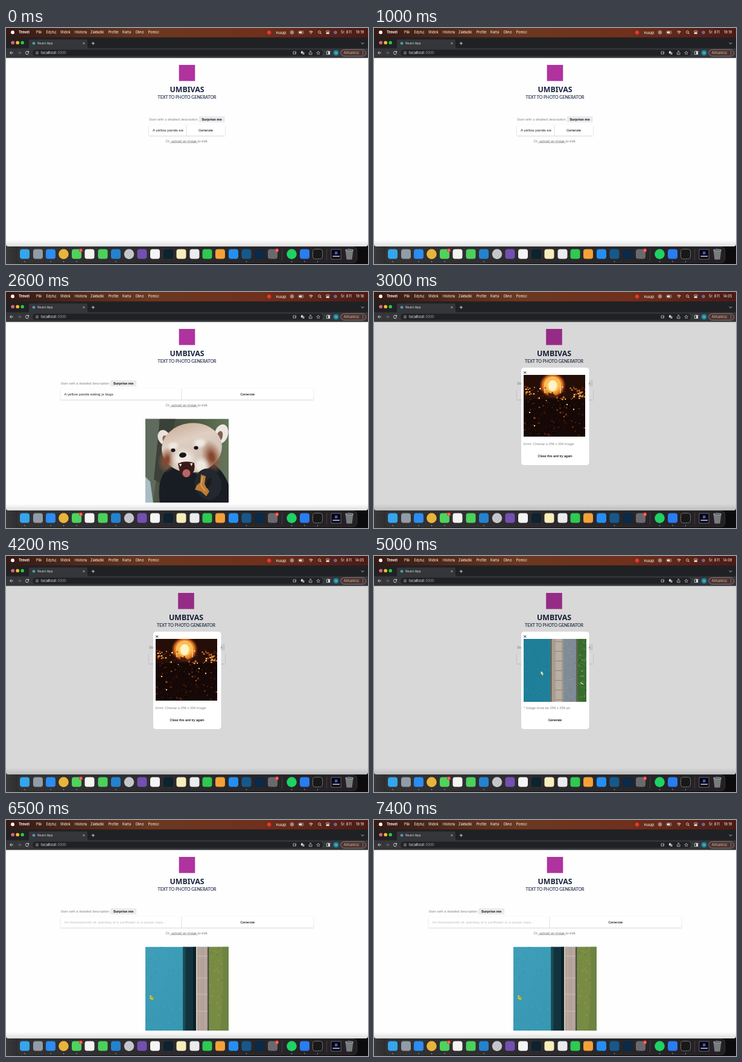
These frames come from a looping animation (600x390 px, 7500 ms). An HTML page:

```html
<!DOCTYPE html>
<html lang="pl">
<head>
<meta charset="utf-8">
<title>Text to photo generator</title>
<style>
html, body { margin: 0; width: 100%; height: 100%; overflow: hidden; background: #120d0d; }
svg { display: block; width: 100vw; height: 100vh; }
text { white-space: pre; font-family: "Liberation Sans", Arial, sans-serif; }
.ui { font-family: Inter, Roboto, sans-serif; }
.brand { font-family: "Noto Sans", "Open Sans", sans-serif; }
.tag { font-family: Lato, "Open Sans", sans-serif; }
</style>
</head>
<body>
<svg id="stage" viewBox="0 0 600 390" preserveAspectRatio="none">
  <defs>
    <linearGradient id="bar">
      <stop offset="0" stop-color="#351a13"/><stop offset=".4" stop-color="#6c3820"/>
      <stop offset=".7" stop-color="#70301c"/><stop offset="1" stop-color="#4b1a16"/>
    </linearGradient>
    <linearGradient id="desk">
      <stop offset="0" stop-color="#39383a"/><stop offset=".06" stop-color="#252426"/>
      <stop offset=".5" stop-color="#171517"/><stop offset="1" stop-color="#0b0a0c"/>
    </linearGradient>
    <linearGradient id="shelf">
      <stop offset="0" stop-color="#333235"/><stop offset="1" stop-color="#242024"/>
    </linearGradient>
    <linearGradient id="shade" x2="0" y2="1">
      <stop offset="0" stop-opacity="0"/><stop offset="1" stop-opacity=".13"/>
    </linearGradient>
    <linearGradient id="wood">
      <stop offset="0" stop-color="#596653"/><stop offset=".25" stop-color="#454a3f"/>
      <stop offset=".6" stop-color="#4c5940"/><stop offset="1" stop-color="#65775a"/>
    </linearGradient>
    <linearGradient id="face" x2=".25" y2="1">
      <stop offset="0" stop-color="#c9aa94"/><stop offset=".4" stop-color="#dfcfc2"/>
      <stop offset="1" stop-color="#cbbcb0"/>
    </linearGradient>
    <radialGradient id="patch">
      <stop offset=".2" stop-color="#87472f"/><stop offset="1" stop-color="#a36c50" stop-opacity="0"/>
    </radialGradient>
    <radialGradient id="pale">
      <stop offset=".4" stop-color="#efe8e1"/><stop offset="1" stop-color="#e4d8cd" stop-opacity="0"/>
    </radialGradient>
    <linearGradient id="sea" x2="1" y2="1">
      <stop offset="0" stop-color="#3f9eb8"/><stop offset="1" stop-color="#3494b1"/>
    </linearGradient>
    <radialGradient id="glow">
      <stop offset="0" stop-color="#fff3b8"/><stop offset=".45" stop-color="#ffc251"/>
      <stop offset=".74" stop-color="#d9691a"/><stop offset="1" stop-color="#3a1208" stop-opacity="0"/>
    </radialGradient>
    <filter id="soft" x="-10%" y="-30%" width="120%" height="180%">
      <feDropShadow dx="0" dy="1" stdDeviation="1" flood-color="#223" flood-opacity=".22"/>
    </filter>
    <clipPath id="field"><rect x="240" y="160" width="53.5" height="18"/></clipPath>
    <clipPath id="p138"><rect width="138" height="138.5"/></clipPath>
    <clipPath id="p102"><rect width="102" height="102"/></clipPath>
    <clipPath id="p104"><rect width="104" height="104"/></clipPath>
  </defs>
</svg>
<script>
const LOOP = 7500;
const rect = (x, y, w, h, fill, more = "") =>
  `<rect x="${x}" y="${y}" width="${w}" height="${h}" fill="${fill}" ${more}/>`;
const dot = (x, y, r, fill, more = "") => `<circle cx="${x}" cy="${y}" r="${r}" fill="${fill}" ${more}/>`;
const oval = (x, y, rx, ry, fill, turn = 0) =>
  `<ellipse cx="${x}" cy="${y}" rx="${rx}" ry="${ry}" fill="${fill}" transform="rotate(${turn} ${x} ${y})"/>`;
const text = (x, y, s, size, fill, more = "") =>
  `<text x="${x}" y="${y}" font-size="${size}" fill="${fill}" ${more}>${s}</text>`;
const line = (d, color, w = 0.9, more = "") =>
  `<path d="${d}" fill="none" stroke="${color}" stroke-width="${w}" ${more}/>`;
const shape = (d, fill) => `<path d="${d}" fill="${fill}"/>`;
const MID = 'text-anchor="middle"', BOLD = 'font-weight="700"', UI = 'class="ui"';

function seeded(n) {
  return () => (n = (n * 16807) % 2147483647) / 2147483647;
}

function specks(seed, count, [x, y, w, h], colors, size) {
  const rnd = seeded(seed);
  let out = "";
  for (let i = 0; i < count; i++) {
    const px = x + rnd() * w, py = y + rnd() * h, s = size * (0.4 + rnd());
    out += rect(px.toFixed(1), py.toFixed(1), s.toFixed(1), (s * 0.8).toFixed(1),
      colors[Math.floor(rnd() * colors.length)]);
  }
  return out;
}

function menuBar() {
  const items = [[50, "Plik"], [66.5, "Edytuj"], [90, "Widok"], [114, "Historia"], [140, "Zakładki"],
    [169.5, "Profile"], [193, "Karta"], [214.5, "Okno"], [235.5, "Pomoc"]];
  return rect(0, 0, 600, 16, "url(#bar)") + dot(11, 7.2, 2.9, "#fff") +
    text(21, 9.3, "Trovel", 5.9, "#fff", `${UI} ${BOLD}`) +
    items.map(([x, s]) => text(x, 9.3, s, 5.6, "#fff", UI)).join("") +
    dot(436, 7.5, 3.3, "#e2392c") + text(447.5, 9.6, "nuup", 7, "#fff", UI) +
    dot(474, 7.2, 2.7, "none", 'stroke="#fff" stroke-width=".7"') + shape("M473.2 5.7l2.4 1.5-2.4 1.5z", "#fff") +
    rect(485, 5, 8, 4.4, "none", 'rx="1.2" stroke="#ddd" stroke-width=".6"') + rect(486, 6, 4.5, 2.4, "#fff") +
    line("M502.5 6.2q3-2.4 6 0M503.7 7.7q1.8-1.4 3.6 0", "#fff") + dot(505.5, 9.1, 0.7, "#fff") +
    dot(519.5, 6.7, 2, "none", 'stroke="#fff" stroke-width=".7"') + line("M521 8.2l1.8 1.8", "#fff") +
    rect(530.5, 4.6, 5.5, 2.2, "none", 'rx="1.1" stroke="#fff" stroke-width=".6"') +
    rect(530.5, 7.6, 5.5, 2.2, "#fff", 'rx="1.1"') + dot(546, 7.2, 2.8, "#6d6699") +
    text(555, 9.3, "Śr. 8.11", 5.7, "#fff", UI) + text(593.3, 9.3, "", 5.7, "#fff", `${UI} id="clock" text-anchor="end"`);
}

function browser() {
  const pale = "#dfe1e5";
  return `<path d="M0 49.5V18q0-2.5 2.5-2.5h595q2.5 0 2.5 2.5v31.5z" fill="#202124"/>` +
    ["#fe5f57", "#febc2e", "#28c840"].map((c, i) => dot(11.2 + i * 8, 24.2, 2.8, c)).join("") +
    rect(0, 33.5, 600, 16, "#35363a") +
    shape("M35 34q3 0 3-3v-9q0-3 3-3h91q3 0 3 3v9q0 3 3 3z", "#35363a") +
    dot(46, 25.3, 2.4, "#4a9fb0") + text(52.3, 27.2, "React App", 5.2, pale, UI) +
    line("M127.3 23.8l3 3m0-3l-3 3", pale, 0.7) + line("M141.8 25.3h5.2m-2.6-2.6v5.2", pale) +
    line("M588.8 24.3l2.2 2.2 2.2-2.2", pale) +
    line("M12 41H6.7m2.4-2.5L6.6 41l2.5 2.5", pale) + line("M19.5 41h5.3m-2.4-2.5L24.9 41l-2.5 2.5", "#77797d") +
    line("M37.2 39.6a2.6 2.6 0 1 0 .4 2", pale) + shape("M38 37.8v2.7h-2.7z", pale) +
    rect(44, 35.8, 481, 10.4, "#202124", 'rx="5.2"') +
    dot(51.5, 41, 2.2, "none", 'stroke="#bdc1c6" stroke-width=".7"') + rect(51.1, 40.5, 0.8, 1.8, "#bdc1c6") +
    text(58, 43.1, 'localhost<tspan fill="#9aa0a6">:3000</tspan>', 5.9, "#f1f3f4", UI) +
    line("M476 39h2.5m2 2v2H476v-4m4-1v3m-1.2-1l1.2 1.2 1.2-1.2", pale, 0.7) +
    rect(489, 38.5, 3.3, 3.6, pale) + rect(491.2, 40.2, 3.3, 3.6, "#9aa0a6") +
    line("M503.2 40.5h-.8v3.2h4.6v-3.2h-.8m-1.5 1.2v-3.9m-1.2 1.1l1.2-1.2 1.2 1.2", pale, 0.7) +
    line("M517.6 38.2l.8 1.9 2 .2-1.5 1.4.4 2-1.7-1-1.7 1 .4-2-1.5-1.4 2-.2z", pale, 0.6) +
    rect(531.4, 38.4, 5.3, 5.2, "none", `rx=".6" stroke="${pale}" stroke-width=".8"`) + rect(534, 38.4, 2.7, 5.2, pale) +
    dot(547, 41, 4.5, "#13899a") + text(547, 42.8, "N", 4.8, "#cfeaf0", `${UI} ${MID}`) +
    rect(555, 35.7, 41.5, 10.8, "#443533", 'rx="5.4" stroke="#c98a80" stroke-width=".7"') +
    text(559.5, 43, "Aktualizuj", 5.5, "#f1b2a7", UI) +
    [38.8, 41, 43.2].map(y => dot(591.5, y, 0.6, "#f1b2a7")).join("");
}

function dock() {
  const icons = [[31, "#35a5ec"], [53, "#929ba6"], [74, "#2b8df0"], [95.5, "#e9b43b", 1], [117, "#4dd45d"],
    [138.5, "#f5f3f0"], [160.5, "#4bd15c"], [182, "#2383cf"], [204, "#c4c6cc", 1], [225.5, "#7350b2"],
    [247, "#f5f5f5"], [269, "#0e222f"], [290.5, "#f8eebb"], [312.5, "#e9ebec"], [333.5, "#2fca50"],
    [355, "#f3a13a"], [377, "#2490f3"], [398.5, "#16588c"], [420.5, "#0b2a47"], [442, "#686a70"],
    [473.5, "#1fd264", 1], [495, "#287df0"], [516.5, "#17181a"]];
  const badge = x => dot(x, 367.5, 3, "#f1453d") + text(x, 369, "2", 4, "#fff", `${UI} ${MID}`);
  return rect(20, 361.6, 562, 26.4, "url(#shelf)", 'rx="6" stroke="#434145" stroke-width=".5"') +
    icons.map(([x, c, round]) => round ? dot(x, 373.6, 8.3, c) :
      rect(x - 8, 365.6, 16, 16, c, `rx="3.8" ${x === 516.5 ? 'stroke="#8a8b8e" stroke-width=".7"' : ""}`)).join("") +
    badge(124) + badge(449) +
    [457.5, 531.5].map(x => rect(x, 365, 0.6, 19, "#5b5a5f")).join("") +
    rect(539, 366, 16, 16, "#05060d", 'stroke="#9999a2" stroke-width=".6"') + rect(545, 369.5, 4.5, 4.5, "#4254dd") +
    rect(541.5, 376.5, 11.5, 1.6, "#c6c8d8") +
    shape("M562.5 367h13l-1.8 14.5q-.2 1.2-1.3 1.2h-6.8q-1.1 0-1.3-1.2z", "#777b80") +
    oval(569, 367, 6.7, 1.8, "#b5b8bc") + oval(569, 367.2, 5.2, 1.1, "#5d6165") +
    [31, 74, 95.5, 117, 182, 398.5, 473.5, 495, 516.5].map(x => dot(x, 386, 0.7, "#c9c9cc")).join("");
}

function logo(dx) {
  return `<g transform="translate(${dx} 0)">` + rect(286.7, 61, 26.6, 26.6, "#b0329f") +
    text(300, 106, "UMBIVAS", 12.4, "#1b2440", `class="brand" ${MID} ${BOLD}`) +
    text(300, 116.7, "TEXT TO PHOTO GENERATOR", 7, "#26304d",
      `class="tag" ${MID} stroke="#26304d" stroke-width=".15"`) + "</g>";
}

function form(wide, words, color) {
  const x = wide ? 90.5 : 237, w = wide ? 419 : 126, split = wide ? 291 : 299;
  return text(x, 153, "Start with a detailed description", 5.82, "#858585") +
    rect(x + 82.5, 145.7, 43.3, 10.3, "#ebebef", 'rx="1.5"') +
    text(x + 87.2, 153, "Surprise me", 5.8, "#111", BOLD) +
    rect(x, 160, w, 17.5, "#fff", 'rx="1.5" filter="url(#soft)"') + rect(split - 0.4, 160, 0.8, 17.5, "#d8d8df") +
    `<g ${wide ? "" : 'clip-path="url(#field)"'}>` + text(x + 6, 170.8, words, 6.18, color) + "</g>" +
    text((split + x + w) / 2, 170.8, "Generate", 5.76, "#444", `${MID} stroke="#444" stroke-width=".15"`) +
    text(264.5, 188.5, 'Or,<tspan text-decoration="underline"> upload an image </tspan>to edit.', 5.75, "#777");
}

const sheet = (fill, more = "") => `<path d="M0 49.5H600V357q0 4-4 4H4q-4 0-4-4z" fill="${fill}" ${more}/>`;

const page = body => sheet("#fefefe") + body;

function photo(x, y, size, body) {
  return `<g transform="translate(${x} ${y})" clip-path="url(#p${size})">${body}</g>`;
}

function panda() {
  return rect(0, 0, 138, 139, "url(#wood)") + shape("M0 0h22q6 45-2 85l-8 54H0z", "#5f6b5c") +
    shape("M24 0h26L36 60 30 110 14 100z", "#3a4138") + shape("M0 96l8 8 5 35H0z", "#a9bcc6") +
    shape("M24 139q-6-44 16-58l66-12q24 16 32 40v30z", "#171d23") +
    oval(31, 31, 10, 13, "#e9e2da", -25) + oval(34, 35, 5, 8, "#8a6a58", -25) +
    oval(126, 25, 11, 16, "#ece7e0", 15) + oval(123, 29, 5, 9, "#806153", 15) +
    oval(77, 48, 50, 41, "url(#face)", -6) +
    oval(36, 68, 15, 22, "url(#patch)", 12) + oval(110, 63, 17, 29, "url(#patch)", -15) +
    oval(46, 45, 12, 9, "url(#pale)", -10) + oval(90, 40, 14, 10, "url(#pale)", -10) +
    oval(63, 66, 25, 20, "url(#pale)") + oval(92, 78, 15, 17, "url(#pale)", -10) +
    oval(46, 52, 3.6, 3, "#1a1413") + oval(84, 48, 3.6, 3, "#1a1413") +
    oval(62, 60, 6, 4.2, "#1a1716", -6) +
    shape("M54 74q12-6 27-1 3 13-7 23-11 4-16-5z", "#3b1918") + oval(68, 90, 6.5, 6.5, "#b86766", -15) +
    shape("M56 74.5l2 5 2.5-5zm18-1l2.5 5 2-5z", "#f1e6da") +
    oval(104, 108, 22, 26, "#22282d", -12) +
    shape("M92 92l8 3-2 13 8 12-5 8-9-8-10-3 3-7 6-5z", "#bd7b35") + line("M95 96l-3 14 7 9", "#dba45a", 1.6) +
    oval(105, 106, 4, 9, "#181d22", 20);
}

function sparks() {
  return rect(0, 0, 102, 102, "#150806") + rect(0, 0, 102, 40, "#30120a", 'opacity=".65"') +
    oval(48, 17, 23, 22, "url(#glow)") +
    line("M35 30V17a13 13 0 0 1 26 0v13", "#ffdf8d", 1.8, 'stroke-dasharray="1.8 .8"') +
    oval(48, 18, 7, 9, "#fff4c8") + shape("M41 36v-7l4 2 3-3 5 8z", "#4a1c0b") +
    specks(71, 60, [0, 18, 101, 24], ["#f29a3f", "#b34a16", "#6b2611", "#ffc871"], 2.2) +
    specks(17, 16, [2, 20, 18, 12], ["#ffb95a", "#d8702a"], 2.2) +
    specks(23, 18, [78, 22, 22, 20], ["#ffc56b", "#c95f22"], 2.2) +
    specks(29, 130, [0, 40, 101, 61], ["#48180d", "#6a2310", "#2c100a", "#080303", "#a94d20"], 2.2) +
    [[10, 62], [83, 57], [18, 84], [72, 49], [84, 33]].map(([x, y]) => dot(x, y, 1.2, "#ffce82")).join("");
}

function canal() {
  return rect(0, 0, 104, 104, "#1f7f99") + specks(11, 110, [0, 0, 43, 104], ["#2c8ba2", "#18738d"], 1.4) +
    rect(44.5, 0, 22, 104, "#a99e91") + rect(44.5, 0, 2, 104, "#5d584f") + rect(51, 0, 13, 104, "#b9afa2") +
    Array.from({ length: 7 }, (_, i) => rect(52, 4 + i * 16, 12, 0.8, "#82786e")).join("") +
    line("M52 0v104M64 0v104", "#887e73", 0.7) +
    rect(66.5, 0, 22, 104, "#7f8c97") + specks(53, 85, [67, 0, 20, 104], ["#94a0a7", "#6c7986", "#928b82"], 1.4) +
    rect(87, 0, 2.5, 104, "#6b6149") + rect(89.5, 0, 15, 104, "#386d30") +
    specks(91, 80, [89, 0, 15, 104], ["#4b853b", "#275427", "#719b4a"], 1.7) +
    oval(30.5, 57, 1.6, 3.2, "#eee5b5", -25) + dot(31, 58, 1, "#e3a42c") + line("M94 72l5 3", "#eceee4", 1.3);
}

function shore() {
  return rect(0, 0, 138, 139, "url(#sea)") + specks(37, 75, [0, 0, 61, 138], ["#48a5bd", "#338ea9"], 1.7) +
    rect(62.5, 0, 22, 139, "#12323d") + rect(62.5, 0, 4, 139, "#194a57") + rect(79, 0, 5, 139, "#0a2029") +
    rect(84, 0, 2, 139, "#d5c8b8") + rect(86, 0, 17, 139, "#b3a29a") + line("M90 0v139M99 0v139", "#c4b6ac", 0.8) +
    [15, 51, 78, 106].map(y => rect(86, y, 17, 1, "#cdbfb4")).join("") +
    rect(103, 0, 2.5, 139, "#514f37") + rect(105.5, 0, 33, 139, "#788b43") +
    specks(43, 70, [105, 0, 33, 139], ["#84964d", "#697c3a", "#918f52"], 2.6) +
    shape("M128 0h10v139h-14q7-65 4-139z", "#6f8342") +
    shape("M7.3 80l3 1 3.5 5-2.2 2-4-2z", "#e9c532") + line("M9 82l3 4", "#705e24", 0.8);
}

function modal(image, note, action) {
  return page(logo(-1.5) + form(false, "", "#999")) + sheet("#000", 'opacity=".15"') +
    rect(244, 125, 112.5, 161, "#fff", 'rx="4.5"') +
    line("M248.4 131.2l3.8 3.8m0-3.8l-3.8 3.8", "#222", 1) + image +
    text(248, 252.5, note[0], note[1], "#828282") +
    text(300, 272.6, action, 5.45, "#111", `${MID} stroke="#111" stroke-width=".1"`);
}

const scenes = [
  [0, "19:19", page(logo(0) + form(false, "A yellow panda eating js bugs", "#222"))],
  [1500, "19:18", page(logo(0) + form(true, "A yellow panda eating js bugs", "#222") + photo(231, 209.5, 138, panda()))],
  [3000, "14:05", modal(photo(248, 137, 102, sparks()), ["Error: Choose a 256 x 256 image", 5.67], "Close this and try again")],
  [4500, "14:09", modal(photo(248, 137, 104, canal()), ["* Image must be 256 x 256 px", 5.8], "Generate")],
  [6000, "19:19", page(logo(0) + form(true, "An impressionist oil  painting of a sunflower in a purple vase...", "#bdbdc2") + photo(231, 209.5, 138, shore()))]
];

const stage = document.getElementById("stage");
stage.insertAdjacentHTML("beforeend", rect(0, 0, 600, 390, "url(#desk)") + menuBar() + browser() +
  scenes.map(s => `<g class="scene" display="none">${s[2]}</g>`).join("") +
  rect(0, 350, 600, 11, "url(#shade)") + dock());
const views = stage.querySelectorAll(".scene"), clock = document.getElementById("clock");
const start = performance.now();
let shown = -1;

function draw() {
  const now = Math.max(0, performance.now() - start) % LOOP;
  const next = scenes.findLastIndex(s => s[0] <= now);
  if (next !== shown) {
    views.forEach((v, i) => v.setAttribute("display", i === next ? "inline" : "none"));
    clock.textContent = scenes[next][1];
    shown = next;
  }
  requestAnimationFrame(draw);
}
draw();
</script>
</body>
</html>
```
